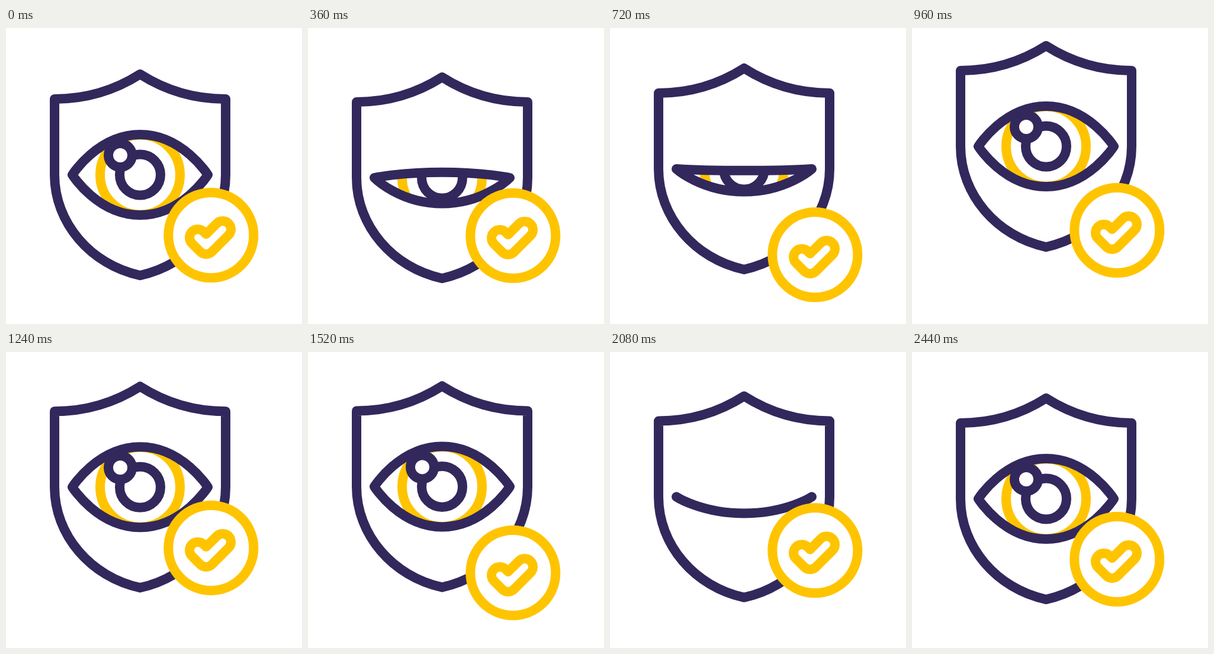
Animation of 500x500 px, one loop 2600 ms. Source, as an HTML page:

```html
<!DOCTYPE html>
<html lang="en">
<head>
<meta charset="utf-8">
<title>Shield, eye and check</title>
<style>
  html, body { margin: 0; width: 100%; height: 100%; overflow: hidden; background: #fff; }
  svg { display: block; width: 100%; height: 100%; }
  svg * { stroke-width: 16; stroke-linecap: round; stroke-linejoin: round; }
  .navy { fill: none; stroke: #32285c; }
  .gold { fill: none; stroke: #ffc400; }
  .white { fill: #fff; }
</style>
</head>
<body>
<svg viewBox="0 0 500 500">
  <defs>
    <clipPath id="opening"><path id="gap"/></clipPath>
  </defs>
  <g id="shield">
    <path class="navy" d="M226.5 78C184 105 134 120 82 120V248C82 329 143 400 226.5 418C310 400 371 329 371 248V120C319 120 269 105 226.5 78Z"/>
    <g clip-path="url(#opening)">
      <circle class="gold" cx="226.5" cy="248" r="67.5"/>
      <circle class="navy" cx="226.5" cy="248" r="34.5"/>
      <circle class="navy white" cx="193" cy="215" r="20"/>
    </g>
    <path id="lids" class="navy"/>
  </g>
  <g id="badge">
    <circle class="gold white" cx="346.3" cy="350" r="72"/>
    <path class="gold" d="M338 348.2L356.1 330.1A14 14 0 0 1 375.9 349.9L347.9 377.9A14 14 0 0 1 328.1 377.9L314.1 363.9A14 14 0 0 1 333.9 344.1Z"/>
  </g>
</svg>
<script>
  const LOOP = 2600, STEP = 40, SWING = 400;
  const CLOSE = 350, SHUT = 88, OPEN = 357;
  const el = id => document.getElementById(id);
  const shield = el('shield'), badge = el('badge'), lids = el('lids'), gap = el('gap');

  const clamp = u => Math.min(1, Math.max(0, u));
  const ease = u => (1 - Math.cos(Math.PI * clamp(u))) / 2;

  // Rest, one eased swing to each turning point, then rest again
  function bob(t, start, ...turns) {
    const swings = (t - start) / SWING;
    let y = 0;
    [...turns, 0].forEach((to, i) => y += (to - (turns[i - 1] || 0)) * ease(swings - i));
    return y;
  }

  // 1 outside the blink, 0 while shut
  function blink(t, start) {
    return 1 - ease((t - start) / CLOSE) + ease((t - start - CLOSE - SHUT) / OPEN);
  }

  // Both lids meet at a sag of 28 when the eye is shut
  function eyePath(open) {
    const up = 276 - 96 * open, low = 276 + 40 * open;
    return `M112 248C112 248 155 ${up} 226.5 ${up}S341 248 341 248` +
           `C341 248 298 ${low} 226.5 ${low}S112 248 112 248Z`;
  }

  const moveY = (node, y) => node.setAttribute('transform', `translate(0 ${y})`);

  function draw(now) {
    const t = Math.floor(now % LOOP / STEP) * STEP;
    const d = eyePath(blink(t, 160) * blink(t, 1645));
    lids.setAttribute('d', d);
    gap.setAttribute('d', d);
    moveY(shield, bob(t, 160, 10, -48, -12.5, -36));
    moveY(badge, bob(t, 320, 33, -30, 23, -22.5));
  }

  const start = performance.now();
  function tick() {
    draw(performance.now() - start);
    requestAnimationFrame(tick);
  }
  tick();
</script>
</body>
</html>
```
